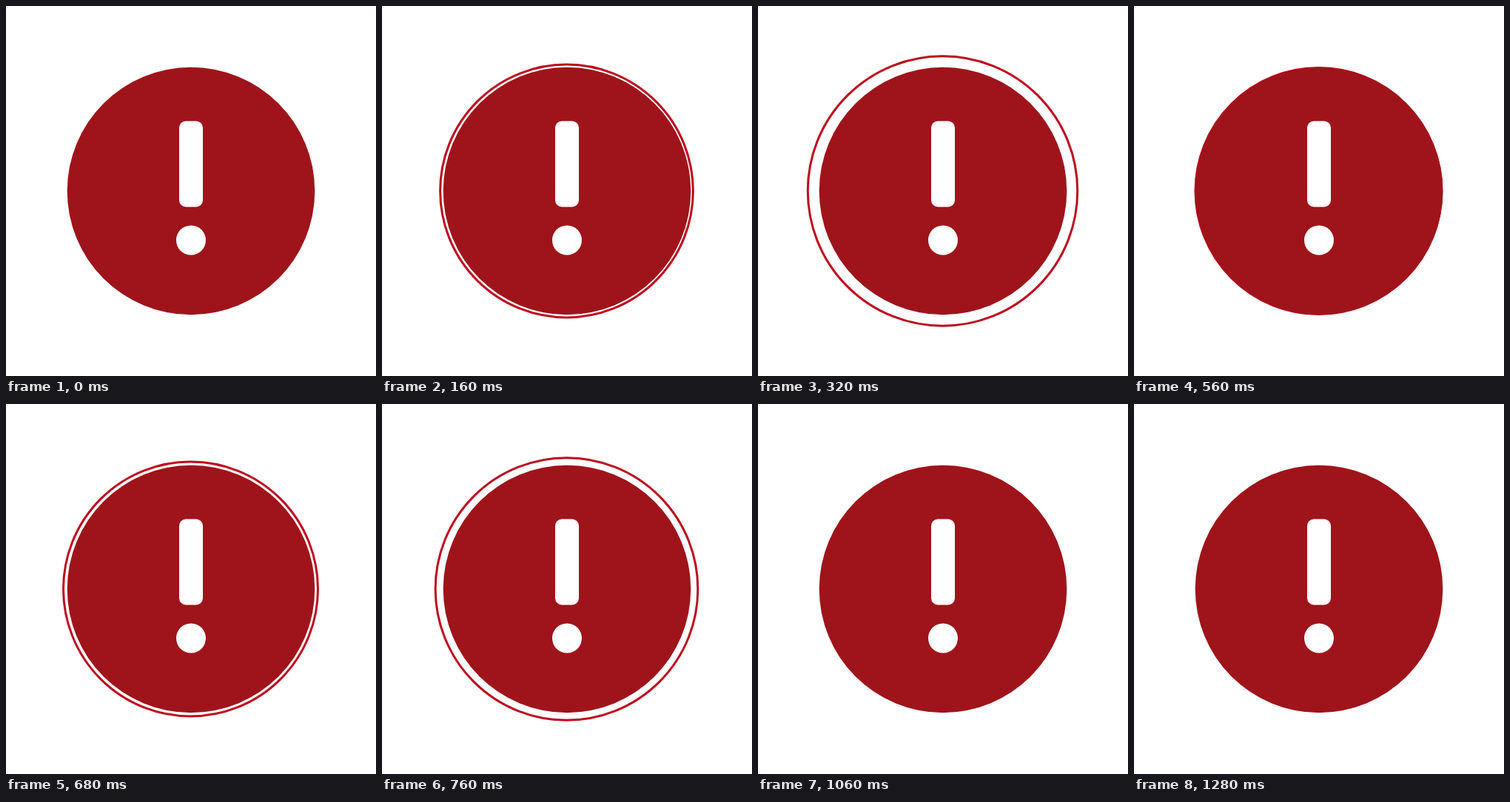
These frames come from a looping animation (500 by 500 pixels, 1300 ms). An HTML page:

```html
<!DOCTYPE html>
<html lang="en">
<head>
<meta charset="utf-8">
<title>Alert pulse</title>
<style>
  html, body { margin: 0; height: 100%; overflow: hidden; background: #fff; }
  svg { display: block; width: 100%; height: 100%; }
</style>
</head>
<body>
<svg viewBox="0 0 500 500">
  <circle id="ring" cx="249.5" cy="250" fill="none" stroke="#be0a1e" stroke-width="3"/>
  <circle cx="250" cy="250" r="167.3" fill="#9f141b"/>
  <rect x="234" y="155.5" width="32" height="116" rx="9" fill="#fff"/>
  <circle cx="250" cy="316.5" r="20" fill="#fff"/>
</svg>
<script>
  const LOOP = 1300, STEP = 20;
  const pulses = [{ start: 60, end: 360 }, { start: 560, end: 820 }];
  const ring = document.getElementById('ring');

  // Outer radius grows with a gentle acceleration, then the ring cuts out.
  const outerRadius = n => 168 + 0.667 * n + 0.0417 * n * n;

  function draw(now) {
    const t = Math.floor(now % LOOP / STEP) * STEP;
    const pulse = pulses.find(p => t >= p.start && t < p.end);
    ring.style.visibility = pulse ? 'visible' : 'hidden';
    if (pulse) ring.setAttribute('r', outerRadius((t - pulse.start) / STEP) - 1.5);
    requestAnimationFrame(draw);
  }

  const origin = performance.now();
  const tick = () => draw(Math.max(0, performance.now() - origin));
  tick();
</script>
</body>
</html>
```
